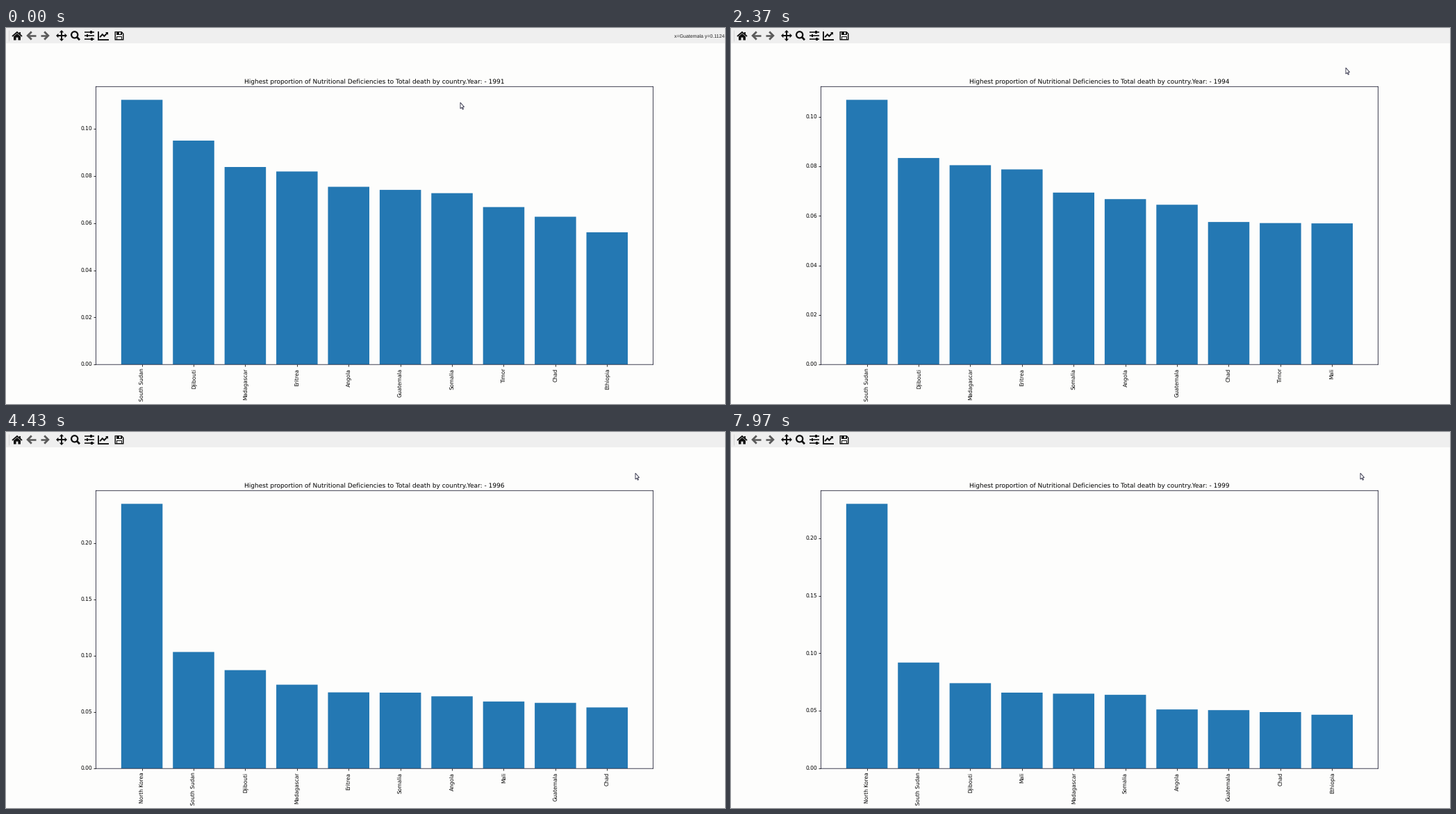
Animation of 1035x541 px, one loop 8000 ms. Source, as a matplotlib script:

```python
import numpy as np
import matplotlib.pyplot as plt
from matplotlib.animation import FuncAnimation
from matplotlib.patches import Circle, Polygon, Rectangle

W, H, DPI = 1035, 541, 64
FRAMES, STEP = 250, 32
FIRST_CHANGE, YEAR_MS = 295, 1033.3
LEFT, RIGHT, TOP, BOTTOM = W * 0.125, W * 0.9, 84.3, 484.2
BAR_TOOL = 21.7

INK, GREY, BLUE = "#101010", "#5a5a5a", "#2478b3"
PAPER, PANEL = "#fdfdfc", "#efefef"

plt.rcParams["font.family"] = "DejaVu Sans"
plt.rcParams["text.hinting"] = "none"


def px(n):
    """Pixels to points."""
    return n * 72 / DPI


# Bends of each country's trend: (years after 1991, share in ten-thousandths
# of a per cent point); the values between lie on straight lines.
TRENDS = {
    "South Sudan": [(0, 1123), (5, 1033), (7, 926), (8, 920)],
    "Djibouti": [(0, 950), (1, 842), (3, 834), (5, 872), (7, 809), (8, 741)],
    "Madagascar": [(0, 838), (3, 805), (8, 650)],
    "Eritrea": [(0, 819), (1, 935), (3, 788), (7, 562), (8, 460)],
    "Angola": [(0, 754), (1, 730), (2, 682), (5, 640), (7, 522), (8, 513)],
    "Guatemala": [(0, 741), (1, 722), (4, 607), (8, 507)],
    "Somalia": [(0, 727), (8, 640)],
    "Timor": [(0, 668), (8, 410)],
    "Chad": [(0, 627), (8, 490)],
    "Ethiopia": [(0, 561), (1, 572), (8, 467)],
    "Mali": [(2, 558), (7, 618), (8, 659)],
    "North Korea": [(3, 0), (4, 2706), (5, 2346), (8, 2298)],
}


def ranking(year):
    """The ten highest (share, country) pairs of a year."""
    shares = [(np.interp(year, *zip(*bends)) / 1e4, name)
              for name, bends in TRENDS.items()]
    return sorted(shares, reverse=True)[:10]


fig = plt.figure(figsize=(W / DPI, H / DPI), dpi=DPI, facecolor=PAPER)

# Chart
ax = fig.add_axes([LEFT / W, 1 - BOTTOM / H, (RIGHT - LEFT) / W,
                   (BOTTOM - TOP) / H], facecolor=PAPER)
bars = ax.bar(range(10), np.ones(10), color=BLUE, snap=False)
ax.set_xlim(-0.89, 9.89)
ax.tick_params(length=px(2.7), pad=px(2.7), width=px(0.8), labelsize=px(7.5))
ax.tick_params(axis="x", rotation=90)
for spine in ax.spines.values():
    spine.set(linewidth=px(0.8), edgecolor="#14142a", snap=False)

# Toolbar and pointer, in pixel units from the top left
ui = fig.add_axes([0, 0, 1, 1], zorder=2)
ui.set(xlim=(0, W), ylim=(H, 0))
ui.axis("off")


def shape(points, color=INK):
    ui.add_patch(Polygon(points, facecolor=color, linewidth=0))


def stroke(points, width, color=INK):
    x, y = zip(*points)
    ui.plot(x, y, color=color, lw=px(width), solid_capstyle="butt",
            solid_joinstyle="miter")


def box(x, y, w, h, color=INK):
    ui.add_patch(Rectangle((x, y), w, h, facecolor=color, linewidth=0))


def home_icon(x, y):
    stroke([(x - 7, y + 1), (x, y - 5), (x + 7, y + 1)], 1.9)
    box(x + 3, y - 5.5, 2, 4)
    shape([(x - 5, y + 1.2), (x, y - 3), (x + 5, y + 1.2), (x + 5, y + 6.5),
           (x + 1.4, y + 6.5), (x + 1.4, y + 2.6), (x - 1.4, y + 2.6),
           (x - 1.4, y + 6.5), (x - 5, y + 6.5)])


def arrow_icon(x, y, d):
    stroke([(x - 6.5 * d, y), (x + 4 * d, y)], 2.6, GREY)
    stroke([(x - 0.8 * d, y - 5.6), (x + 4.8 * d, y), (x - 0.8 * d, y + 5.6)],
           2.8, GREY)


def move_icon(x, y):
    for dx, dy in ((1, 0), (-1, 0), (0, 1), (0, -1)):
        stroke([(x, y), (x + 6 * dx, y + 6 * dy)], 2)
        shape([(x + 8 * dx, y + 8 * dy),
               (x + 4.6 * dx + 3.2 * dy, y + 4.6 * dy + 3.2 * dx),
               (x + 4.6 * dx - 3.2 * dy, y + 4.6 * dy - 3.2 * dx)])


def zoom_icon(x, y):
    ui.add_patch(Circle((x - 1.3, y - 1.2), 4.6, fill=False, ec=INK, lw=px(2.2)))
    stroke([(x + 2, y + 2), (x + 6, y + 6.2)], 2.8)


def sliders_icon(x, y):
    for dy, knob in ((-4.8, 2.5), (0, -3), (4.8, 3.5)):
        stroke([(x - 7, y + dy), (x + 7, y + dy)], 1.6)
        box(x + knob - 1.4, y + dy - 2, 2.8, 4)


def plot_icon(x, y):
    stroke([(x - 7, y - 6), (x - 7, y + 5.6), (x + 8, y + 5.6)], 1.9)
    stroke([(x - 4.8, y + 2.2), (x - 1.2, y - 1.8), (x + 1.4, y + 0.8),
            (x + 5.6, y - 3.6)], 2)
    shape([(x + 2.8, y - 5.2), (x + 7.2, y - 5.2), (x + 7.2, y - 0.8)])


def save_icon(x, y):
    shape([(x - 6.5, y - 6), (x + 3.5, y - 6), (x + 6.5, y - 3),
           (x + 6.5, y + 6.5), (x - 6.5, y + 6.5)])
    box(x - 5.2, y - 4.8, 1.2, 10, PANEL)
    box(x + 4, y - 3, 1.2, 8, PANEL)
    box(x - 5.2, y - 0.6, 10.4, 1.2, PANEL)
    box(x - 0.2, y - 4.8, 1.8, 3, PANEL)
    box(x - 2.8, y + 1.8, 5.6, 3.4, PANEL)


box(0, 0, W, BAR_TOOL, PANEL)
stroke([(4, 3), (4, 19)], 0.8, "#d2d2d2")
home_icon(16, 11)
arrow_icon(36, 11, -1)
arrow_icon(56, 11, 1)
move_icon(80, 11)
zoom_icon(100, 11)
sliders_icon(120, 11)
plot_icon(140, 11)
save_icon(163, 11)

status = ui.text(W - 1, 11.3, "", ha="right", va="center", color="#202020",
                 family="Liberation Sans", fontsize=px(7))

ARROW = np.array([(0, 0), (0, 8.8), (2, 7), (3.3, 10), (4.5, 9.4),
                  (3.3, 6.6), (5.6, 6.4)])
pointer = ui.add_patch(Polygon(ARROW, facecolor="white", edgecolor="#34344a",
                               linewidth=px(0.9), joinstyle="miter"))

REST, OUT, END = np.array([(654, 107.2), (885, 57.2), (906, 59.2)])


def ease(t, start, stop):
    u = np.clip((t - start) / (stop - start), 0, 1)
    return u * u * (3 - 2 * u)


def pointer_at(t):
    return (REST + (OUT - REST) * ease(t, 1130, 1600)
            + (END - OUT) * ease(t, 2420, 2700))


def status_at(x, y):
    if y < TOP:
        return ""
    slot = int(np.clip((x - 642) / 74.4 + 0.5, 0, 3))
    name = ("Guatemala", "Timor", "Chad", "Ethiopia")[slot]
    return f"x={name} y={0.1124 * (BOTTOM - y) / (BOTTOM - REST[1]):.4f}"


def show_year(k):
    shares, names = zip(*ranking(k))
    for bar, share in zip(bars, shares):
        bar.set_height(share)
    top = shares[0] * 1.05
    ticks = np.arange(0, top, 0.02 if top < 0.15 else 0.05)
    ax.set_yticks(ticks, [f"{v:.2f}" for v in ticks])
    ax.set_ylim(0, top)
    ax.set_xticks(range(10), names)
    ax.set_title("Highest proportion of Nutritional Deficiencies to Total death "
                 f"by country.Year: - {1991 + k}", fontsize=px(9), pad=px(4.3))


def draw(i):
    t = i * STEP + STEP / 2
    show_year(int((t - FIRST_CHANGE) // YEAR_MS) + 1)
    pos = pointer_at(t)
    pointer.set_xy(ARROW + pos)
    status.set_text(status_at(*pos))
    return []


anim = FuncAnimation(fig, draw, frames=FRAMES, interval=STEP,
                     init_func=lambda: draw(0), repeat=True, repeat_delay=0)
plt.show()
```
